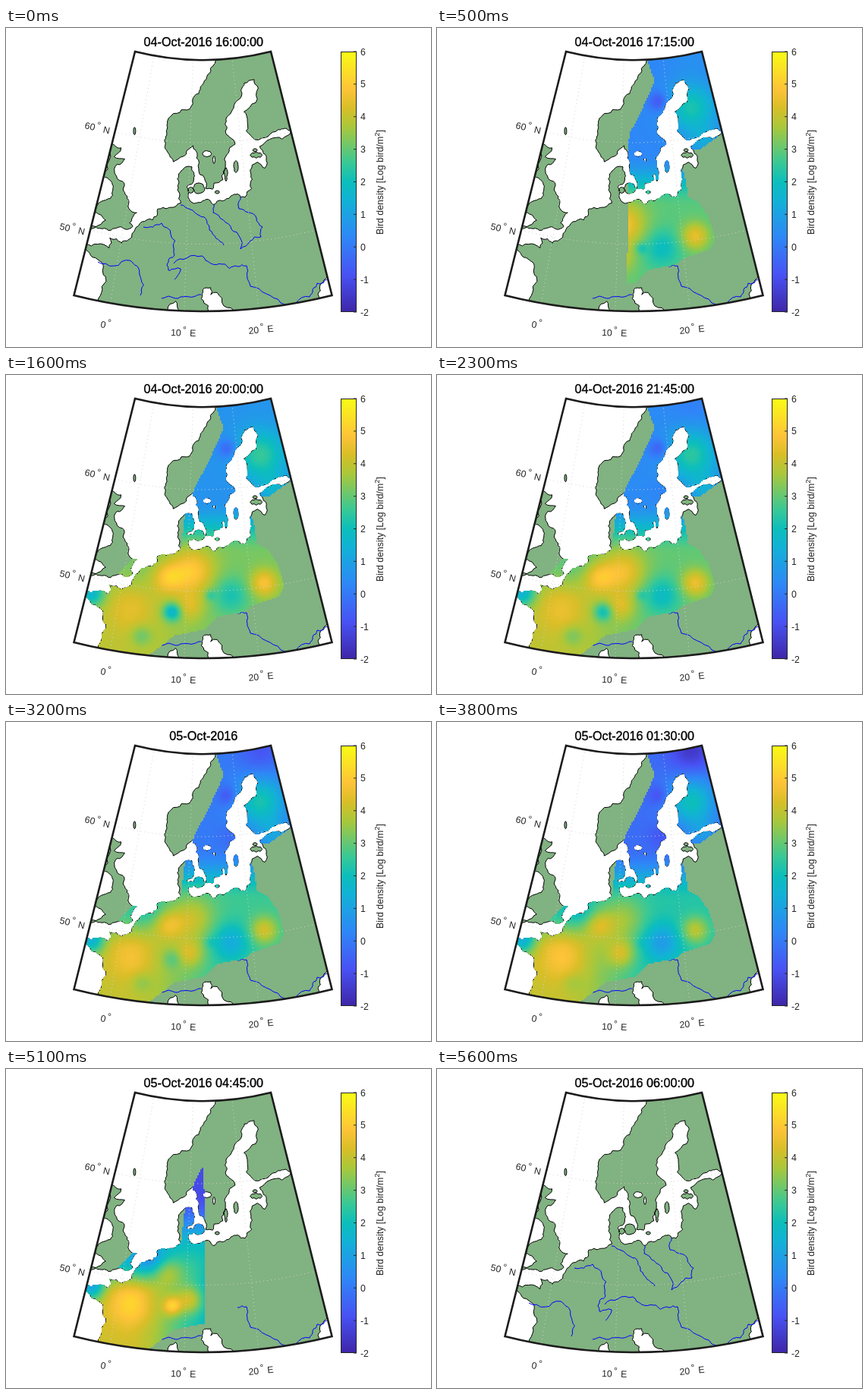
An HTML page with a canvas that plays this animation: 560x420 px, repeating every 5.7 s.

```html
<!DOCTYPE html>
<html lang="en">
<head>
<meta charset="utf-8">
<title>Bird density map</title>
<style>
html, body { margin: 0; width: 560px; height: 420px; overflow: hidden; background: #fff; }
svg, canvas { position: absolute; left: 0; top: 0; width: 560px; height: 420px; }
canvas { image-rendering: pixelated; }
text { font-family: "Liberation Sans", Arial, sans-serif; font-size: 12.3px; fill: #262626; }
#title { font-size: 16.2px; fill: #000; stroke: #000; stroke-width: .35px; }
</style>
</head>
<body>
<svg id="base" viewBox="0 0 560 420">
  <clipPath id="inside"><path class="frame"/></clipPath>
  <g clip-path="url(#inside)" stroke-linejoin="round">
    <path id="land" fill="#81b281" fill-rule="evenodd" stroke="#000" stroke-width="1"/>
    <path id="coveredRivers" fill="none" stroke="#00f"/>
    <path id="openRivers" fill="none" stroke="#00f"/>
  </g>
</svg>
<canvas id="field" width="280" height="210"></canvas>
<svg id="top" viewBox="0 0 560 420">
  <defs><linearGradient id="parula" x1="0" y1="1" x2="0" y2="0"></linearGradient></defs>
  <path id="grid" fill="none" stroke="#d4d4d4" stroke-width="1" stroke-dasharray="1 4"/>
  <path class="frame" fill="none" stroke="#1c1c1c" stroke-width="2.6"/>
  <text id="title" x="260.3" y="24" text-anchor="middle"></text>
  <rect x="441.5" y="31.5" width="20" height="342" fill="url(#parula)" stroke="#262626"/>
  <g id="labels"></g>
  <text transform="translate(497 203) rotate(-90)" text-anchor="middle">Bird density [Log bird/m<tspan dy="-5" font-size="9.5">2</tspan><tspan dy="5">]</tspan></text>
</svg>
<script>
const $ = id => document.getElementById(id);
const FRAME = 'M170,31A368,368 0 0 0 349,31L429.5,352A699,699 0 0 1 89.5,352Z';
document.querySelectorAll('.frame').forEach(p => p.setAttribute('d', FRAME));

// Conic projection
const CX = 259.3, CY = -326, CONE = .01404;
function project([lon, lat]) {
  const r = 1278 - 13.35 * lat, a = (lon - 12.5) * CONE;
  return [CX + r * Math.sin(a), CY + r * Math.cos(a)];
}
const longitude = (x, y) => 12.5 + Math.atan2(x - CX, y - CY) / CONE;

const points = s => s.trim().split(/\s+/).map(p => p.split(',').map(Number));
const line = pts => 'M' + pts.map(p => p.map(v => v.toFixed(1)).join()).join('L');

let seed = 11;
const random = () => (seed = (seed * 16807) % 2147483647) / 2147483647;

// Fractal midpoint displacement gives ragged coasts and winding rivers
function roughen(pts, depth = 3) {
  if (!depth) return pts;
  const out = [pts[0]];
  for (let i = 1; i < pts.length; i++) {
    const [x, y] = pts[i - 1], dx = pts[i][0] - x, dy = pts[i][1] - y, len = Math.hypot(dx, dy);
    const k = (random() - .5) * .4;
    if (len > 4 && len < 70) out.push([x + dx / 2 - dy * k, y + dy / 2 + dx * k]);
    out.push(pts[i]);
  }
  return roughen(out, depth - 1);
}

// Coast corners as lon,lat
const scandinavia = `15.6,68.5 14.4,67.3 12.4,65.7 10.2,64.1 7,62.8 5.1,61.9 5.1,60.4 5.3,59.2 7,58 8.8,58.6
  10.6,59.7 11.3,58.5 12.8,56.5 13,55.5 14.2,55.4 14.5,56 16.1,56.3 16.7,57.9 16.9,58.6 18.8,59.7 17.3,60.7
  17.4,62 19.3,63.5 21.3,64.5 22.2,65.6`;
const eastBaltic = `24.6,65.8 25.2,64.9 21.3,62.8 21.3,60.9 22.9,59.9 27.7,60.5 30,60 28,59.5 23.5,59.2 24.4,58
  23.8,57 22.6,57.7 21.1,57 21,55.2 19.7,54.4 18.5,54.8 16.3,54.3`;
const northSea = `14.2,53.9 13,54.4 11,54 10,54.6 9.7,55.6 10.9,56.4 10.5,57.6 8.4,57 8.1,55.7 8.8,54 7.1,53.5
  5,53.2 4.4,52.1 1.8,50.9 1.5,50.1 .1,49.4 -1.8,49.7 -1.6,48.7 -5.2,48.6 -4.5,47.9 -2.1,47.1 -1.1,45.4 -1.7,43`;
const south = `3,43 6.2,43.1 8.8,44.3 10.5,43 13.6,43 12.3,44.6 12.5,45.5 13.6,45.7 13.6,45 14.5,45.2 16.9,43
  28,43 28.7,44.5 30.2,45.6 32,46 32,68.5`;
const britain = `-6,58.6 -3.1,58.6 -4,57.6 -2,57.6 -3.2,56 -1.6,55.4 -1.2,54.6 .1,53.6 .3,52.9 1.7,52.6 .8,51.5
  1.4,51.2 -1,50.8 -3.6,50.4 -6,50.1 -3,51.3 -5.3,51.8 -4.4,53 -3,53.5 -3.2,54.9 -5.3,55.5 -6,58.6`;

// Islands and lakes as lon, lat, half width, half height
function oval([lon, lat, rx, ry]) {
  const [x, y] = project([lon, lat]);
  return Array.from({ length: 9 }, (_, i) => {
    const a = i % 8 * Math.PI / 4;
    return [x + rx * Math.cos(a), y + ry * Math.sin(a)];
  });
}
const ovals = [[18.6, 57.5, 3, 8], [16.7, 56.8, 2, 9], [11.8, 55.5, 8, 7], [10.4, 55.3, 4, 4], [15, 55.1, 3, 2],
  [22.6, 58.4, 8, 4], [22.5, 58.9, 3, 2], [-1.2, 60.5, 1.5, 5], [13.3, 58.9, 6, 4], [14.6, 58.3, 1.5, 5]];

const coasts = [[scandinavia, eastBaltic, northSea, south].join(' '), britain].map(s => points(s).map(project));
const landPath = [...coasts, ...ovals.map(oval)].map(pts => line(roughen(pts)) + 'Z').join('');
$('land').setAttribute('d', landPath);

const rivers = list => list.map(s => line(roughen(points(s)))).join('');
$('coveredRivers').setAttribute('d', rivers([
  '121,308 163,306 176,325 177,352',
  '181,262 205,257 221,290 222,298 212,312 214,319 230,317 222,331',
  '230,233 255,247 268,266 287,286',
  '274,233 273,243 297,265 309,291',
  '309,222 307,238 330,250 338,262 336,275 309,291',
  '221,310 258,300 285,311 305,314'
]));
$('openRivers').setAttribute('d', rivers([
  '305,314 317,313 322,340 362,362 400,354 410,336 424,330',
  '205,356 230,354 257,351'
]));

// Graticule and labels
const lons = Array.from({ length: 36 }, (_, i) => i - 5);
$('grid').setAttribute('d',
  [0, 10, 20].map(lon => line([[lon, 67.9], [lon, 43.5]].map(project))).join('') +
  [50, 60].map(lat => line(lons.map(lon => project([lon, lat])))).join(''));

const label = (x, y, angle, num, letter) => {
  const w = num.length * 7;
  return `<g transform="translate(${x} ${y}) rotate(${angle})"><text>${num}</text>` +
    `<text x="${w + 1.5}" y="-4" font-size="10">°</text><text x="${w + 11}">${letter}</text></g>`;
};
let labels = label(103, 132, 13, '60', 'N') + label(70, 265, 13, '50', 'N') +
  label(124, 394, 10, '0', '') + label(217, 405, 2, '10', 'E') + label(320, 403, -6, '20', 'E');
for (let v = -2; v <= 6; v++) {
  const y = 374 - (v + 2) * 42.875;
  labels += `<path d="M458,${y}h4" stroke="#262626"/><text x="467" y="${y + 4.5}">${v}</text>`;
}
$('labels').innerHTML = labels;

// Colour scale: position, then red, green, blue
const SCALE = [[0, 62, 38, 168], [.143, 72, 82, 244], [.286, 46, 135, 247], [.429, 18, 177, 214], [.5, 12, 190, 187],
  [.571, 55, 200, 151], [.714, 171, 199, 57], [.786, 217, 190, 40], [.857, 254, 195, 56], [1, 249, 251, 21]];
$('parula').innerHTML = SCALE.map(([t, ...rgb]) => `<stop offset="${t}" stop-color="rgb(${rgb})"/>`).join('');
function colour(v) {
  const t = Math.min(1, Math.max(0, (v + 2) / 8));
  const i = Math.max(1, SCALE.findIndex(s => s[0] >= t)), a = SCALE[i - 1], b = SCALE[i];
  const k = (t - a[0]) / (b[0] - a[0]);
  return [1, 2, 3].map(c => a[c] + (b[c] - a[c]) * k);
}

// Density: a smooth background plus round spots (x, y, radius, evening strength, morning strength)
const spots = [
  [245, 258, 30, 1.8, .9], [213, 266, 20, 1.3, 1.3], [165, 310, 30, .5, 1], [178, 343, 14, -.9, -.2],
  [219, 312, 12, -2.4, 1.3], [243, 305, 18, .8, 1.6], [296, 290, 24, -1, -1.7], [269, 290, 7, -.8, 0],
  [340, 274, 18, 1.6, 1.6], [112, 288, 18, -2.2, -2.6], [188, 250, 20, .1, -1],
  [335, 105, 32, 1.9, 2.5], [352, 148, 20, .8, 1], [335, 38, 28, .2, -2], [292, 97, 13, -1.2, -.6], [295, 150, 16, 0, -.8]
];
const smooth = (a, b, v) => {
  const t = Math.min(1, Math.max(0, (v - a) / (b - a)));
  return t * t * (3 - 2 * t);
};
const mix = (a, b, t) => a + (b - a) * t;

function makeCell(i) {
  const x = i % 280 * 2 + 1, y = Math.floor(i / 280) * 2 + 1, shift = longitude(x, y) / 15;
  return {
    i,
    dusk: 18.02 - shift,
    dawn: 29.6 - shift,
    southness: smooth(165, 235, y),
    westness: smooth(290, 160, x) * smooth(245, 300, y),
    near: spots.map(([sx, sy, r]) => Math.exp(-((x - sx) ** 2 + (y - sy) ** 2) / r ** 2))
  };
}

const coverage = `276,40 287,70 268,112 249,148 236,182 231,226 195,228 183,254 172,236 145,264 95,280 118,376
  183,373 222,343 262,335 280,318 313,312 325,303 360,292 367,278 358,248 345,230 331,222 326,192 317,170
  325,156 345,161 378,137 349,25 272,25`;

function buildCells() {
  const mask = document.createElement('canvas');
  mask.width = 280; mask.height = 210;
  const m = mask.getContext('2d'), land = new Path2D(landPath);
  m.scale(.5, .5);
  m.clip(new Path2D(FRAME));
  m.clip(new Path2D(line(points(coverage)) + 'Z'));
  m.fill(land);
  m.lineWidth = .6;
  m.stroke(land);
  const rgba = m.getImageData(0, 0, 280, 210).data, cells = [];
  for (let i = 0; i < 280 * 210; i++) if (rgba[i * 4 + 3] > 127) cells.push(makeCell(i));
  return cells;
}
const cells = buildCells();
const ctx = $('field').getContext('2d');
const image = ctx.createImageData(280, 210);

function drawField(step) {
  const hour = 16 + step / 4, late = Math.max(0, (step - 10) / 37) ** 1.5;
  const rise = -.08 * Math.max(0, 10 - step);
  const strengths = spots.map(s => mix(s[3], s[4], late));
  const north = .7 - 1.5 * late, southern = 3.3 - 1.5 * late, west = .6 + 1.7 * late;
  image.data.fill(0);
  for (const c of cells) {
    if (hour < c.dusk || hour > c.dawn) continue;
    let v = rise + mix(north, southern + west * c.westness, c.southness);
    strengths.forEach((s, k) => v += s * c.near[k]);
    image.data.set([...colour(v), 255], c.i * 4);
  }
  ctx.putImageData(image, 0, 0);
}

function titleText(step) {
  const minutes = 960 + step * 15, two = n => String(n).padStart(2, '0');
  const day = minutes < 1440 ? '04' : '05', m = minutes % 1440;
  return `${day}-Oct-2016` + (m ? ` ${two(Math.floor(m / 60))}:${two(m % 60)}:00` : '');
}

let shown = -1;
function render() {
  const step = Math.floor(performance.now() % 5700 / 100);
  if (step !== shown) {
    shown = step;
    $('title').textContent = titleText(step);
    $('coveredRivers').style.display = step > 0 && step < 56 ? 'none' : '';
    drawField(step);
  }
  requestAnimationFrame(render);
}
render();
</script>
</body>
</html>
```
